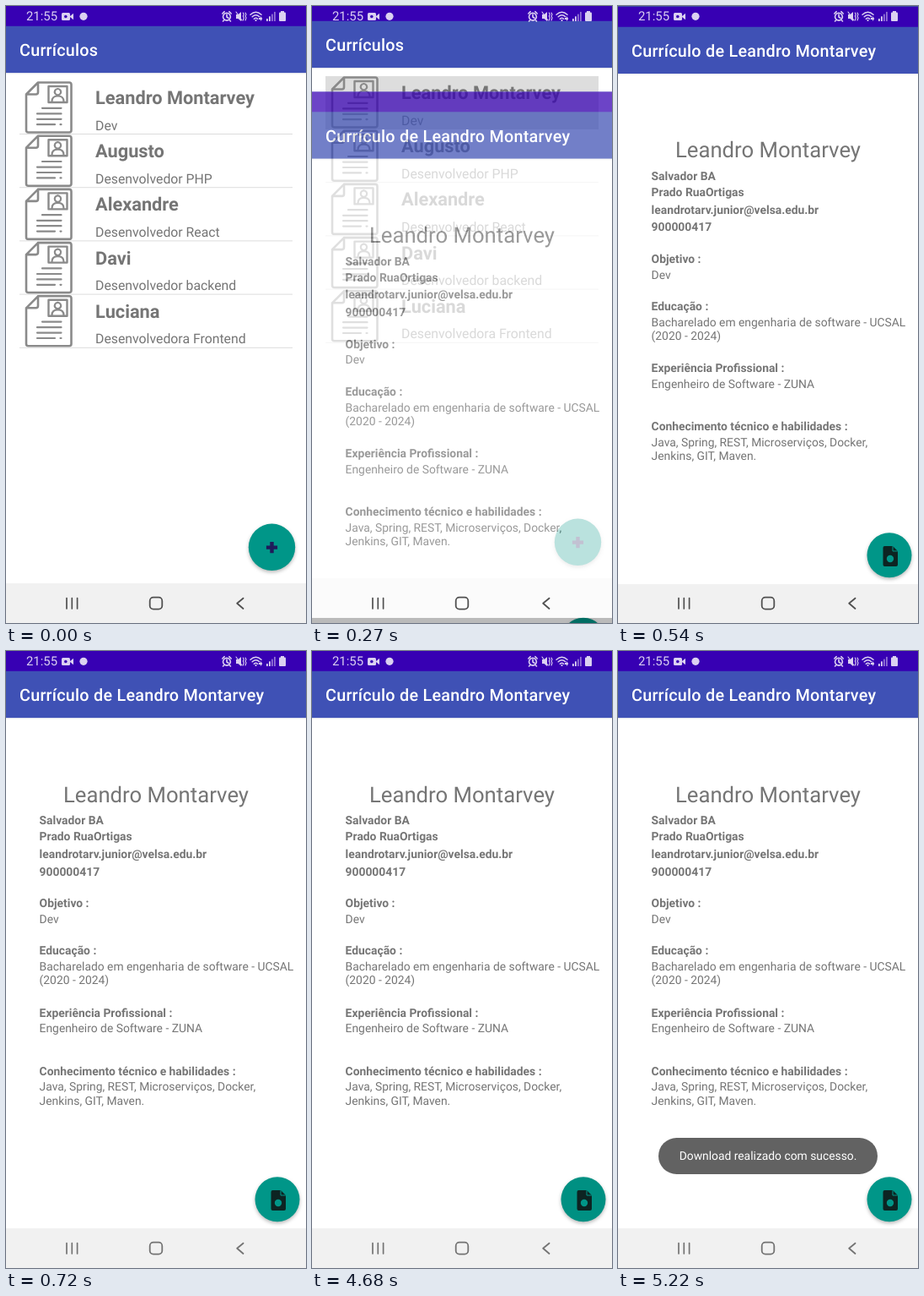
Animation, 356 px wide and 730 px high, one loop 6.39 s. Source, as an HTML page:

```html
<!DOCTYPE html>
<html lang="pt-BR">
<head>
<meta charset="utf-8">
<title>Currículos</title>
<style>
  html, body { margin: 0; width: 100%; height: 100%; overflow: hidden; background: #000; }
  svg { display: block; width: 100%; height: 100%; font-family: Roboto, sans-serif; text-rendering: geometricPrecision; }
  .small { font-size: 13.85px; fill: #757575; }
  .strong { font-weight: 700; }
  .name { font-size: 21.76px; font-weight: 700; fill: #757575; }
  .role { font-size: 15.82px; fill: #757575; }
  .bar { font-size: 19.78px; font-weight: 500; letter-spacing: .0125em; fill: #fff; }
  .line { fill: none; stroke-linecap: round; stroke-linejoin: round; }
  .fab { fill: #009688; filter: drop-shadow(0 2.5px 2px rgba(0, 0, 0, .28)); }
</style>
</head>
<body>
<svg id="stage" viewBox="0 0 356 730"></svg>
<script>
const LOOP = 6390, STEP = 90;
const person = 'Leandro Montarvey';
const people = [
  [person, 'Dev'],
  ['Augusto', 'Desenvolvedor PHP'],
  ['Alexandre', 'Desenvolvedor React'],
  ['Davi', 'Desenvolvedor backend'],
  ['Luciana', 'Desenvolvedora Frontend']
];
// baseline, text, bold
const resume = [
  [205.3, 'Salvador BA', 1],
  [224.1, 'Prado RuaOrtigas', 1],
  [244.9, 'leandrotarv.junior@velsa.edu.br', 1],
  [265.5, '900000417', 1],
  [303, 'Objetivo :', 1],
  [321.8, 'Dev'],
  [359.2, 'Educação :', 1],
  [378, 'Bacharelado em engenharia de software - UCSAL'],
  [394.2, '(2020 - 2024)'],
  [432.5, 'Experiência Profissional :', 1],
  [451.3, 'Engenheiro de Software - ZUNA'],
  [501.5, 'Conhecimento técnico e habilidades :', 1],
  [520.3, 'Java, Spring, REST, Microserviços, Docker,'],
  [536.5, 'Jenkins, GIT, Maven.']
];

const text = (x, y, css, value, extra = '') =>
  `<text x="${x}" y="${y}" class="${css}" ${extra}>${value}</text>`;
const rect = (x, y, w, h, fill, extra = '') =>
  `<rect x="${x}" y="${y}" width="${w}" height="${h}" fill="${fill}" ${extra}/>`;
const circle = (x, y, r, extra) => `<circle cx="${x}" cy="${y}" r="${r}" ${extra}/>`;
const line = (d, color, width) =>
  `<path class="line" d="${d}" stroke="${color}" stroke-width="${width}"/>`;

// Opaque window: status strip, title bar, body and navigation strip
const screen = (id, title, body) => `<g id="${id}">
  ${rect(0, 0, 356, 730, '#fff')}
  ${rect(0, 79, 356, 2.5, 'url(#barShadow)')}
  ${rect(0, 0, 356, 79.1, '#3f51b5')}
  ${rect(0, 0, 356, 23.8, '#3700b3')}
  ${text(16, 59, 'bar', title)}
  ${body}
  ${rect(0, 683, 356, 47, '#f1f1f1')}
</g>`;

const documentIcon = line('M38 90.5H75q2.5 0 2.5 2.5V147q0 2.5-2.5 2.5H26.5q-2.5 0-2.5-2.5V104.5Z' +
    'M38 90.5V102q0 2.5-2.5 2.5H24', '#8a8a8a', 2.6) +
  line('M50.5 95H72.5V114H50.5Z', '#8a8a8a', 2.4) +
  line('M61.5 98a3.7 3.7 0 1 1-.1 0M54.5 113q0-6.5 7-6.5t7 6.5', '#8a8a8a', 2.2) +
  line('M43 120.8H65.5M37 127.4H65.5M37 133.8H65.5M37 140.2H58M64.5 140.2h1', '#8a8a8a', 2.2);

const row = ([name, role], i) => `<g transform="translate(0 ${i * 63.2})">
  ${documentIcon}
  ${text(106, 116, 'name', name)}
  ${text(106, 146.5, 'role', role)}
  ${rect(16, 151, 324, 1, '#dcdcdc')}
</g>`;

const list = rect(16, 89, 324, 62.5, '#000', 'id="press"') +
  people.map(row).join('') +
  circle(315.5, 640.3, 27.7, 'class="fab"') +
  '<path d="M313.3 634h4.4v4.4h4.4v4.4h-4.4v4.4h-4.4v-4.4h-4.4v-4.4h4.4z" fill="#1f1b5a"/>';

const detail = text(178, 178.5, '', person, 'font-size="25.7" fill="#757575" text-anchor="middle"') +
  resume.map(([y, value, bold]) => text(39.6, y, bold ? 'small strong' : 'small', value)).join('') +
  circle(322, 648.8, 26.5, 'class="fab"') +
  circle(322, 648.8, 0, 'id="ripple"') +
  '<path d="M316.5 638H326L332 644V660q0 2-2 2H316.5q-2 0-2-2V640q0-2 2-2Z" fill="#0d2422"/>' +
  line('M326 638.5V644H331.5', '#009688', 1) +
  circle(323, 653, 4.2, 'fill="#009688"') +
  `<g id="toast">${rect(48, 576, 260, 43, '#626262', 'rx="21.5"')}
    ${text(178, 602, 'small', 'Download realizado com sucesso.', 'style="fill:#fff" text-anchor="middle"')}</g>`;

const statusIcons = `<g fill="#fff" opacity=".82">
  <text x="24" y="17.3" font-size="14.9">21:55</text>
  ${rect(66, 8, 10, 9, '#fff', 'rx="1.5"')}<path d="M76 12l4-3.2v7.4l-4-3.2z"/>
  ${circle(70.8, 12.5, 1.8, 'fill="#3700b3"')}
  ${circle(92, 12.3, 4.6, '')}
  ${line('M262 8.3a4.4 4.4 0 1 1-.1 0M262 10v3l2 1.2M256.8 9l2.4-2.3M267.2 9l-2.4-2.3M258.5 17l-1 1M265.5 17l1 1', '#fff', 1.6)}
  <path d="M273 10h2.5l3.5-3v11l-3.5-3H273z"/>
  ${line('M273 7l7 10M281.3 8l1 2-1 2 1 2-1 3M284 8l1 2-1 2 1 2-1 3', '#fff', 1.1)}
  ${line('M290 10.2q6.5-6 13 0M292.2 12.8q4.3-4 8.6 0M294.3 15.2q2.2-2 4.4 0', '#fff', 1.5)}
  ${circle(296.5, 17, 1.1, '')}
  <path d="M300 14h2v-2l2.3 3-2.3 3v-2h-2z"/>
  ${[0, 1, 2, 3].map(i => rect(309 + i * 3, 15 - i * 2.7, 1.8, 3 + i * 2.7, '#fff', i > 1 ? 'opacity=".55"' : '')).join('')}
  ${rect(324, 7.5, 8, 10.5, '#fff', 'rx="1"')}${rect(326, 6, 4, 2, '#fff')}
</g>`;

const navIcons = '<g id="nav">' +
  line('M72 700.5V713M78.3 700.5V713M84.6 700.5V713', '#505050', 1.7) +
  rect(170.7, 699.7, 14.6, 14, 'none', 'rx="4.2" stroke="#505050" stroke-width="1.8"') +
  line('M281.5 700.7L274.2 706.8L281.5 713', '#505050', 1.8) + '</g>';

document.getElementById('stage').innerHTML = `<defs>
  <linearGradient id="barShadow" x2="0" y2="1">
    <stop stop-opacity=".06"/><stop offset="1" stop-opacity="0"/>
  </linearGradient></defs>` +
  screen('list', 'Currículos', list) +
  screen('detail', 'Currículo de ' + person, detail) +
  statusIcons + navIcons;

const clamp = x => Math.max(0, Math.min(1, x));
const set = (id, attributes) => {
  const node = document.getElementById(id);
  for (const key in attributes) node.setAttribute(key, attributes[key]);
};

function draw(now) {
  const t = Math.floor(now % LOOP / STEP) * STEP;
  const opening = (t - 270) / 90;
  const slide = t < 720 ? 101.5 * 0.212 ** opening : 0;
  set('list', {
    transform: `translate(0 ${t < 270 ? 0 : -6 - 14 * Math.min(opening, 2)})`,
    opacity: 1 - 0.12 * clamp(opening)
  });
  set('press', { opacity: 0.135 * clamp(t / 180) });
  set('detail', {
    transform: `translate(0 ${slide})`,
    opacity: t < 270 ? 0 : clamp(0.73 + 0.3 * opening)
  });
  set('nav', { opacity: t < 720 ? 1 : 0.78 });

  const tap = t - 4410;
  set('ripple', {
    r: tap < 0 ? 0 : Math.min(26.5, 16 + tap / 9),
    opacity: tap < 0 ? 0 : 0.13 * clamp((360 - tap) / 270)
  });
  set('toast', { opacity: 1 - (1 - clamp((t - 4680) / 395)) ** 2 });
}

const start = performance.now();
function tick() {
  draw(performance.now() - start);
  requestAnimationFrame(tick);
}
tick();
</script>
</body>
</html>
```
